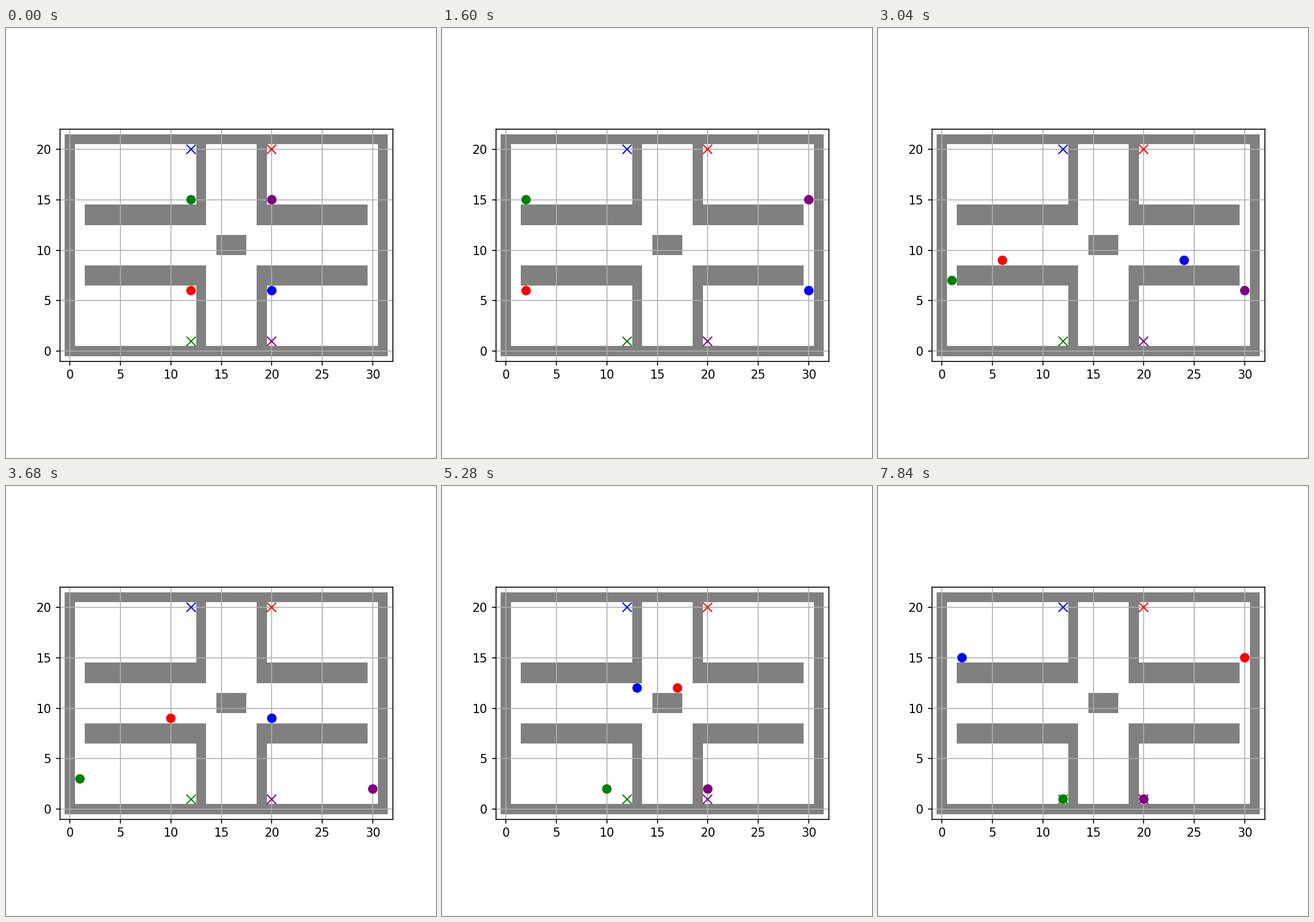
These frames come from a looping animation (748x748 px, 8000 ms). A matplotlib script:

```python
import matplotlib.pyplot as plt
from matplotlib.animation import FuncAnimation
from matplotlib.patches import Circle, Rectangle

FRAMES = 50
INTERVAL = 160
LEFT, RIGHT = 1, 30        # outer columns that link the rooms
LOW, HIGH = 9, 12          # lanes of the middle corridor
CROSS = 14                 # column where agents change lane


def around(start, side, goal):
    """Corners of a route down one side, into the room below."""
    row = goal[1] + 1
    return [start, (side, start[1]), (side, row), (goal[0], row), goal]


def across(start, side, goal):
    """Corners of a route through the corridor to the opposite room."""
    far = LEFT + RIGHT - side
    row = goal[1] - 5
    return [start, (side, start[1]), (side, LOW), (CROSS, LOW), (CROSS, HIGH),
            (far, HIGH), (far, row), (goal[0], row), goal]


ROUTES = {
    "red": across((12, 6), LEFT, (20, 20)),
    "blue": across((20, 6), RIGHT, (12, 20)),
    "green": around((12, 15), LEFT, (12, 1)),
    "purple": around((20, 15), RIGHT, (20, 1)),
}


def position(corners, steps):
    """Cell reached after walking the given number of cells."""
    for (x0, y0), (x1, y1) in zip(corners, corners[1:]):
        length = abs(x1 - x0) + abs(y1 - y0)
        if steps < length:
            t = steps / length
            return x0 + (x1 - x0) * t, y0 + (y1 - y0) * t
        steps -= length
    return corners[-1]


fig, ax = plt.subplots(figsize=(5, 5), dpi=149.6)
ax.set_aspect("equal")
ax.set_xlim(-1, 32)
ax.set_ylim(-1, 22)
ax.set_xticks(range(0, 31, 5))
ax.set_yticks(range(0, 21, 5))
ax.grid(True)


def wall(x, y, w, h):
    """Fill w by h cells, starting at cell (x, y)."""
    ax.add_patch(Rectangle((x - 0.5, y - 0.5), w, h, facecolor="gray", linewidth=0))


for y in (0, 21):
    wall(0, y, 32, 1)
for x in (0, 31):
    wall(x, 0, 1, 22)
for y in (7, 13):
    wall(2, y, 12, 2)
    wall(19, y, 11, 2)
for x in (13, 19):
    wall(x, 0, 1, 9)
    wall(x, 13, 1, 9)
wall(15, 10, 3, 2)

dots = {}
for color, corners in ROUTES.items():
    ax.plot(*corners[-1], "x", color=color, markersize=8)
    dots[color] = ax.add_patch(Circle(corners[0], 0.47, facecolor=color,
                                      linewidth=0, zorder=3))


def update(step):
    for color, dot in dots.items():
        dot.center = position(ROUTES[color], step)
    return list(dots.values())


anim = FuncAnimation(fig, update, frames=FRAMES, interval=INTERVAL,
                     init_func=lambda: update(0), repeat=True, repeat_delay=0)
plt.show()
```
